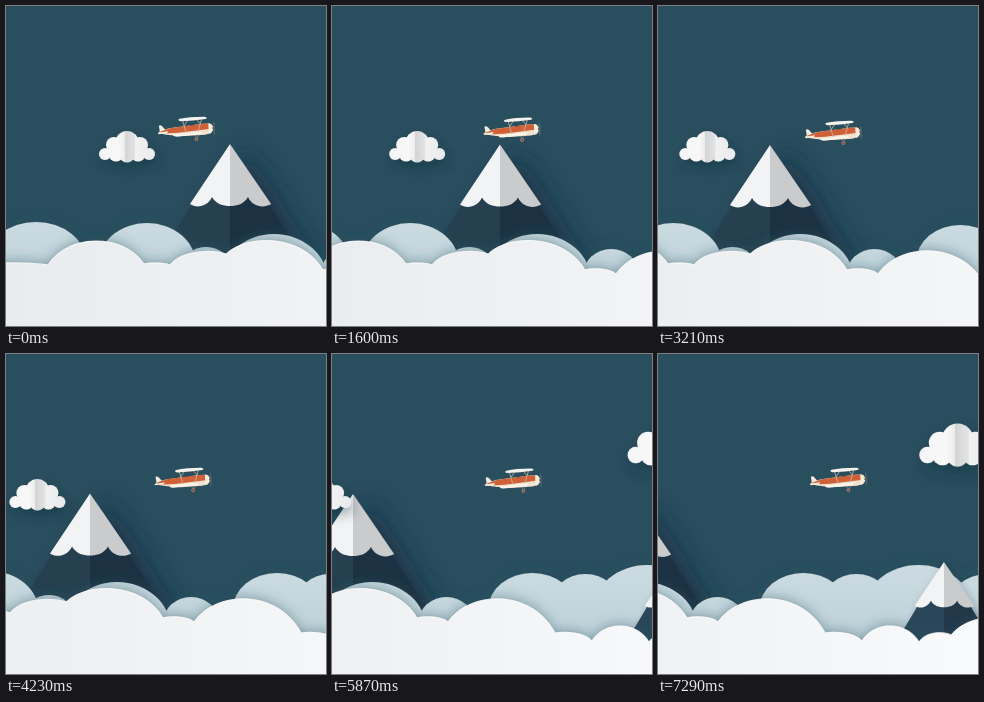
An HTML page for the animation above (7.47 s loop, 320x320 px).

```html
<!DOCTYPE html>
<html lang="en">
<head>
<meta charset="utf-8">
<title>Paper sky</title>
<style>
html, body { margin: 0; width: 100%; height: 100%; overflow: hidden; background: #294e5e; }
svg { display: block; width: 100vw; height: 100vh; }
</style>
</head>
<body>
<svg viewBox="0 0 320 320">
  <defs>
    <linearGradient id="frontFill" gradientUnits="userSpaceOnUse" x1="0" y1="0" x2="620" y2="0">
      <stop offset="0" stop-color="#e9ecef"/><stop offset=".45" stop-color="#eff1f3"/>
      <stop offset=".75" stop-color="#f4f6f7"/><stop offset="1" stop-color="#f9fafb"/>
    </linearGradient>
    <linearGradient id="rearFill" gradientUnits="userSpaceOnUse" x1="0" y1="210" x2="0" y2="275">
      <stop offset="0" stop-color="#cbdbe1"/><stop offset="1" stop-color="#c0d3da"/>
    </linearGradient>
    <linearGradient id="puffFill" gradientUnits="userSpaceOnUse" x1="-28" y1="0" x2="28" y2="0">
      <stop offset="0" stop-color="#f4f5f6"/><stop offset=".35" stop-color="#f8f8f8"/>
      <stop offset=".46" stop-color="#ececed"/><stop offset=".46" stop-color="#d2d3d5"/>
      <stop offset=".64" stop-color="#e2e3e4"/><stop offset=".65" stop-color="#f1f1f2"/>
      <stop offset="1" stop-color="#e9eaeb"/>
    </linearGradient>
    <filter id="soft" x="-40%" y="-40%" width="180%" height="200%">
      <feDropShadow dx="3" dy="6" stdDeviation="6" flood-color="#0f2a38" flood-opacity=".35"/>
    </filter>
    <filter id="wide" x="-40%" y="-40%" width="200%" height="200%">
      <feDropShadow dx="16" dy="6" stdDeviation="13" flood-color="#12283a" flood-opacity=".6"/>
    </filter>
    <filter id="edge" filterUnits="userSpaceOnUse" x="-80" y="190" width="820" height="140">
      <feDropShadow dx="0" dy="-2" stdDeviation="6" flood-color="#2b4d5c" flood-opacity=".4"/>
    </filter>
    <g id="puff" fill="url(#puffFill)">
      <circle cx="-22" cy="7" r="6"/><circle cx="22" cy="7" r="6"/>
      <circle cx="-13" cy="-2" r="8"/><circle cx="13" cy="-2" r="8"/>
      <circle cx="0" cy="-4.500" r="11.500"/>
      <circle cx="-11" cy="7" r="7.500"/><circle cx="11" cy="7" r="7.500"/>
      <circle cx="0" cy="8" r="7.500"/>
    </g>
    <g id="caps">
      <path d="M0 0L-40 60C-33 65 -22 62 -18 53C-14 60 -7 62 0 62Z" fill="#f2f3f4"/>
      <path d="M0 0L41 60C33 65 22 62 18 53C14 60 7 62 0 62Z" fill="#c9cbcd"/>
    </g>
  </defs>
  <rect width="320" height="320" fill="#294e5e"/>
  <g id="farPeak"><g filter="url(#wide)">
    <path d="M0 0L-82 130H0Z" fill="#253f50"/><path d="M0 0L84 130H0Z" fill="#1f3343"/>
    <use href="#caps"/>
  </g></g>
  <g id="smallPuff"><use href="#puff" filter="url(#soft)"/></g>
  <g id="bigPuff"><use href="#puff" transform="scale(1.37)" filter="url(#soft)"/></g>
  <g id="rear" filter="url(#edge)" fill="url(#rearFill)"></g>
  <g id="nearPeak"><g transform="scale(.73)" filter="url(#soft)">
    <path d="M0 0L-78 130H0Z" fill="#2c475a"/><path d="M0 0L78 130H0Z" fill="#203749"/>
    <use href="#caps"/>
  </g></g>
  <g id="front" filter="url(#edge)"></g>
  <g id="plane"><g transform="rotate(-2.5 180 123)">
    <path d="M188 128L190.500 133M193 128L190.500 133" stroke="#8b8580" stroke-width=".7"/>
    <circle cx="190" cy="133.600" r="1.600" fill="#8c4a40" stroke="#b9a89b" stroke-width=".5"/>
    <path d="M153 118.500Q155.500 117.500 157 120L160 124L154 126Z" fill="#f3ebdf"/>
    <path d="M153 124.500L163 121.500L197 118.500L204 118.500Q207.500 120 207 124.500Q206 128.500 199 129.500L178 130Q164 129 153 126Z" fill="#f0e2cd"/>
    <path d="M154 124.500L164 121.500L197 118.500H203V124L172 126.500Q162 127 154 125.700Z" fill="#cf6038"/>
    <path d="M202.500 118.500H204Q207.500 120 207 124.500Q206 128.500 202.500 129Z" fill="#f4ebdc"/>
    <path d="M151.500 125.500L162 124.500L161 126.300L152.500 127Z" fill="#f6eee3"/>
    <path d="M167 128L194 126Q197 127 194 128.500L171 130.300Q166 130 167 128Z" fill="#faf3e7"/>
    <path d="M177 114.500L180 127M182 114.500L178 120M196 114L192 126M191 114L195 119" fill="none" stroke="#c9b8a2" stroke-width=".8"/>
    <path d="M174 112.600Q184 110.800 199 111.500Q203 112.300 200 113.800Q188 115.300 175 115Q171 114 174 112.600Z" fill="#f3f2ee"/>
    <path d="M183 120Q186 118 188 119.500Z" fill="#493c3c"/>
    <ellipse cx="208" cy="123.500" rx="1" ry="7" fill="#7b8a8d" opacity=".4"/>
    <circle cx="207.500" cy="123.500" r="1.200" fill="#6b5550"/>
  </g></g>
</svg>
<script>
const $ = id => document.getElementById(id);

function addPath(parent, d, attrs = {}) {
  const p = document.createElementNS("http://www.w3.org/2000/svg", "path");
  p.setAttribute("d", d);
  for (const k in attrs) p.setAttribute(k, attrs[k]);
  parent.append(p);
}

// Rear clouds, half ellipses on a column: centre x, top, rx, ry
const rearDomes = [
  [30, 216, 50, 40], [85, 235, 24, 22], [141, 217, 49, 42], [268, 228, 54, 48],
  [200, 241, 26, 24], [342, 243, 28, 26], [612, 220, 40, 35], [543, 211, 54, 45],
  [481, 220, 34, 30], [428, 219, 44, 36]
];
for (const [cx, top, rx, ry] of rearDomes)
  addPath($("rear"), `M${cx - rx} 310V${top + ry}a${rx} ${ry} 0 0 1 ${2 * rx} 0V310Z`);

// A dome runs between two notches and rises to the height `top`.
function arc(x0, y0, x1, y1, top) {
  const w = (x1 - x0) * 0.21, c = (top - (y0 + y1) / 8) * 4 / 3;
  return `C${x0 + w} ${c} ${x1 - w} ${c} ${x1} ${y1}`;
}

// x, y of the next notch, then the height of the dome before it
const notches = [
  [42, 259, 257], [138, 258, 235], [164, 259, 257], [220, 248, 246],
  [317, 264, 235], [348, 268, 263], [455, 279, 245], [492, 287, 279],
  [549, 288, 272], [581, 281, 279], [680, 290, 263]
];
let ridge = "M-50 330V262", px = -50, py = 262;
for (const [x, y, top] of notches) {
  ridge += arc(px, py, x, y, top);
  px = x; py = y;
}
addPath($("front"), ridge + "V330Z", { fill: "url(#frontFill)", stroke: "#fff", "stroke-width": 0.8 });

// Start of each step, in hundredths of a second
const starts = [0, 20, 40, 60, 79, 100, 120, 140, 160, 181, 201, 222, 242,
  261, 281, 301, 321, 343, 365, 384, 404, 425, 446, 466, 487,
  507, 527, 547, 567, 587, 607, 628, 647, 670, 689, 709, 729];
const LOOP = 7470;

// step, dx, dy of the plane's drift
const drift = [[0, 0, 0], [4, 2, -1], [11, -2, 2], [16, -5, 4], [25, -1, 2], [32, 2, 5], [36, 0, 3]];

function driftAt(s) {
  let k = 0;
  while (k < drift.length - 2 && drift[k + 1][0] <= s) k++;
  const a = drift[k], b = drift[k + 1];
  const u = (s - a[0]) / (b[0] - a[0]), e = u * u * (3 - 2 * u);
  return [a[1] + (b[1] - a[1]) * e, a[2] + (b[2] - a[2]) * e];
}

function place(id, x, y) {
  $(id).setAttribute("transform", `translate(${x.toFixed(2)} ${y.toFixed(2)})`);
}

function draw(t) {
  let s = starts.length - 1;
  while (starts[s] * 10 > t) s--;
  place("farPeak", 224 - 7 * s, 138 + 0.07 * s);
  place("smallPuff", 121 - 4.48 * s, 141);
  place("bigPuff", 476 - 4.9 * s, 91.5);
  place("rear", -7.85 * s, 0);
  place("nearPeak", 574 - 8 * s, 208);
  place("front", -8 * s, 0);
  place("plane", ...driftAt(s));
}

const begin = performance.now();
function tick() {
  draw((performance.now() - begin) % LOOP);
  requestAnimationFrame(tick);
}
tick();
</script>
</body>
</html>
```
